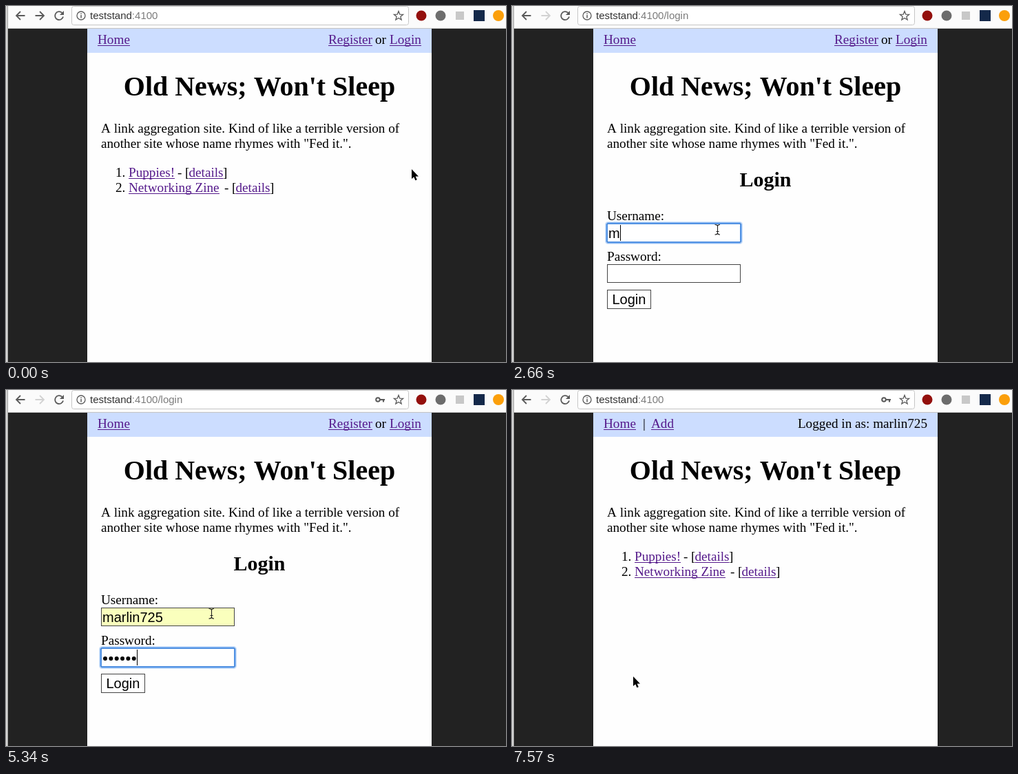
Animation, 726 px wide and 517 px high, one loop 8000 ms. Source, as an HTML page with a canvas:

```html
<!DOCTYPE html>
<html lang="en">
<head>
<meta charset="utf-8">
<title>Login demo</title>
<style>
  html, body { margin: 0; width: 100%; height: 100%; overflow: hidden; background: #222; }
  canvas { display: block; width: 726px; height: 517px; }
</style>
</head>
<body>
<canvas id="stage" width="726" height="517"></canvas>
<script>
const ctx = document.getElementById('stage').getContext('2d');
const LOOP = 8000;
const SERIF = '"Liberation Serif", serif';
const SANS = '"Liberation Sans", sans-serif';
const BODY = `19.2px ${SERIF}`;
const FIELD = `20px ${SANS}`;
const LINK = '#551a8b';
const HOST = 'teststand', PORT = ':4100', USER = 'marlin725';
const DOT = 8.35;

// [start, shape, x, y]
const pointer = [
  [0, 'arrow', 589, 237], [300, 'arrow', 589, 226], [450, 'arrow', 588, 185],
  [600, 'arrow', 587, 130], [750, 'arrow', 586, 84], [900, 'hand', 586, 60],
  [1020, 'hand', 585, 55], [1470, 'arrow', 545, 95], [1620, 'arrow', 390, 232],
  [1770, 'arrow', 301, 306], [1920, 'beam', 298, 322], [2070, 'beam', 298, 325],
  [6830, 'beam', 282, 334], [6980, 'arrow', 212, 388], [7130, 'arrow', 177, 416],
  [7280, 'arrow', 176, 416]
];
// [start, number of password characters]
const typed = [[0, 0], [4750, 1], [4900, 2], [5050, 4], [5190, 5], [5340, 6], [5930, 7], [6230, 9]];

const current = (list, t) => list.findLast(s => t >= s[0]);
const within = (t, a, b) => t >= a && t < b;

function box(x, y, w, h, color) {
  ctx.fillStyle = color;
  ctx.fillRect(x, y, w, h);
}

function frame(x, y, w, h, fill, stroke) {
  box(x, y, w, h, stroke);
  box(x + 1, y + 1, w - 2, h - 2, fill);
}

function disc(x, y, r, color) {
  ctx.fillStyle = color;
  ctx.beginPath();
  ctx.arc(x, y, r, 0, 7);
  ctx.fill();
}

function text(s, x, y, font = BODY, color = '#000', align = 'left') {
  ctx.font = font;
  ctx.fillStyle = color;
  ctx.textAlign = align;
  ctx.fillText(s, x, y);
  return ctx.measureText(s).width;
}

function link(s, x, y) {
  const w = text(s, x, y, BODY, LINK);
  box(x, y + 2, Math.round(w), 1, LINK);
}

function line(d, color, width = 1.8) {
  ctx.strokeStyle = color;
  ctx.lineWidth = width;
  ctx.stroke(new Path2D(d));
}

function star(x, y) {
  ctx.beginPath();
  for (let i = 0; i < 10; i++) {
    const a = i * Math.PI / 5 - Math.PI / 2, r = i % 2 ? 3 : 7;
    ctx.lineTo(x + r * Math.cos(a), y + r * Math.sin(a));
  }
  ctx.closePath();
  ctx.strokeStyle = '#5a5a5a';
  ctx.lineWidth = 1.3;
  ctx.stroke();
}

function toolbar(t) {
  const gray = '#5a5a5a';
  const loading = within(t, 1170, 1320) || within(t, 7280, 7570);
  box(0, 0, 726, 32, '#fbfbfb');
  box(0, 32, 726, 1, '#c3c3c3');
  line('M27.5 14H15.5M21 8L15 14L21 20', gray);
  line('M42.5 14H54.5M49 8L55 14L49 20', t < 1170 ? gray : '#d2d2d2');
  if (loading) {
    line('M71.5 8.5L82.5 19.5M82.5 8.5L71.5 19.5', gray);
  } else {
    line('M81.5 10A6 6 0 1 0 83 15.5', gray);
    ctx.fillStyle = gray;
    ctx.fill(new Path2D('M84 7V13H78Z'));
  }

  ctx.beginPath();
  ctx.roundRect(95.5, .5, 489, 27, 3);
  ctx.fillStyle = '#fff';
  ctx.fill();
  ctx.strokeStyle = '#c6c6c6';
  ctx.lineWidth = 1;
  ctx.stroke();
  ctx.beginPath();
  ctx.arc(109, 14, 6, 0, 7);
  ctx.strokeStyle = gray;
  ctx.lineWidth = 1.3;
  ctx.stroke();
  box(108.3, 13, 1.5, 4.5, gray);
  box(108.3, 10.5, 1.5, 1.5, gray);

  const font = `15px ${SANS}`;
  const w = text(HOST, 122, 19, font, '#333');
  text(PORT + (within(t, 1170, 7570) ? '/login' : ''), 122 + w, 19, font, '#7b7b7b');
  star(570, 14.5);
  if (t >= 4750) {
    ctx.beginPath();
    ctx.arc(540, 14, 2.8, 0, 7);
    ctx.strokeStyle = gray;
    ctx.lineWidth = 2;
    ctx.stroke();
    line('M543 14H550M548 14V17.5', gray, 2.2);
  }

  disc(603, 14, 7.5, '#930f0c');
  disc(631, 14, 7.5, '#6c6c6c');
  box(653, 8, 12, 12, '#c8c8c8');
  box(679, 6, 16, 16, '#14294a');
  disc(715, 14, 8, '#fb9f0b');
}

function header(loggedIn) {
  box(118, 33, 500, 35, '#ccddff');
  link('Home', 133, 55);
  if (loggedIn) {
    text('|', 190, 55);
    link('Add', 202, 55);
    text('Logged in as: ' + USER, 603, 55, BODY, '#000', 'right');
  } else {
    link('Register', 468, 55);
    text('or', 536, 55);
    link('Login', 557, 55);
  }
}

function item(n, label, y, dash) {
  text(n + '.', 159, y);
  link(label, 178, y);
  text('-', dash, y);
  text('[', dash + 11, y);
  link('details', dash + 16.5, y);
  text(']', dash + 66, y);
}

function ring(y) {
  for (const [grow, color] of [[2.5, '#d3e4fa'], [1.5, '#8dbaf2'], [.5, '#5595e6'], [-.5, '#4f8fe0']]) {
    ctx.beginPath();
    ctx.roundRect(138 - grow, y - grow, 194 + 2 * grow, 27 + 2 * grow, Math.max(0, grow + 1));
    ctx.strokeStyle = color;
    ctx.lineWidth = 1;
    ctx.stroke();
  }
}

function caret(x, y) {
  box(Math.round(x), y, 1, 23, '#000');
}

function form(t) {
  const filled = t >= 3410;
  const name = filled ? USER : t >= 2660 ? USER[0] : '';
  const count = current(typed, t)[1];

  text('Login', 368, 262, `bold 30px ${SERIF}`, '#000', 'center');
  text('Username:', 138, 311);
  text('Password:', 138, 370);
  frame(138, 316, 194, 27, filled ? '#faffbd' : '#fff', '#444');
  frame(138, 375, 194, 27, '#fff', '#444');
  frame(138, 412, 64, 28, '#fff', '#444');
  text('Login', 145.5, 433, FIELD);

  if (within(t, 2220, 4300)) ring(316);
  if (t >= 4300) ring(375);
  const nameWidth = text(name, 140, 337, FIELD);
  for (let i = 0; i < count; i++) disc(144 + i * DOT, 390, 3, '#000');

  if (within(t, 2220, 3410) || within(t, 3860, 4300)) caret(140 + nameWidth, 318);
  if (within(t, 4300, 5780) || within(t, 5930, 6680)) caret(140 + count * DOT, 377);

  if (within(t, 2810, 3860)) {
    frame(138, 343, 194, 27, filled ? '#b0d5fe' : '#fff', '#b4c6d9');
    text(USER, 147, 362, `bold 14px ${SANS}`);
  }
}

function page(t) {
  box(0, 33, 726, 484, '#222');
  box(118, 33, 500, 484, '#fefefe');
  header(t >= 7570);
  text("Old News; Won't Sleep", 368, 130, `bold 40px ${SERIF}`, '#000', 'center');
  text('A link aggregation site. Kind of like a terrible version of', 138, 184);
  text('another site whose name rhymes with "Fed it.".', 138, 206);
  if (within(t, 1320, 7570)) {
    form(t);
  } else {
    item(1, 'Puppies!', 248, 249);
    item(2, 'Networking Zine', 270, 317);
  }
}

const ARROW = new Path2D('M0 0V14L3.2 11.2L5.4 16.2L7.8 15.2L5.6 10.4H10Z');
const HAND = new Path2D('M-1.5 1.5Q0-.5 1.5 1.5V6Q3.5 5 4.2 6.5Q6 5.8 6.7 7.5Q8.7 7 8.8 9V12L7 17H-1.5L-5.5 11Q-5.5 8.5-3.5 9.5L-1.5 11.5Z');

function cursor(t) {
  const [, shape, x, y] = current(pointer, t);
  ctx.save();
  ctx.translate(x, y);
  ctx.lineJoin = 'round';
  if (shape === 'arrow') {
    ctx.strokeStyle = '#fff';
    ctx.lineWidth = 2;
    ctx.stroke(ARROW);
    ctx.fillStyle = '#000';
    ctx.fill(ARROW);
  } else if (shape === 'hand') {
    ctx.fillStyle = '#fff';
    ctx.fill(HAND);
    ctx.strokeStyle = '#000';
    ctx.lineWidth = 1.2;
    ctx.stroke(HAND);
    line('M1.5 6V9M4.2 7V9.5M6.7 8V10M1 12V15M3.2 12V15M5.4 12V15', '#000', .9);
  } else {
    line('M-3.5-7.5Q0-7.5 .5-5.5Q1-7.5 4-7.5M.5-5.5V5M-3.5 7Q0 7 .5 5Q1 7 4 7M-1.5 2.5H2.5', '#222', 1.1);
  }
  ctx.restore();
}

function draw() {
  const t = performance.now() % LOOP;
  toolbar(t);
  page(t);
  box(0, 0, 2, 517, '#d6d6d6');
  box(2, 0, 1, 517, '#a2a2a2');
  cursor(t);
  requestAnimationFrame(draw);
}
draw();
</script>
</body>
</html>
```
